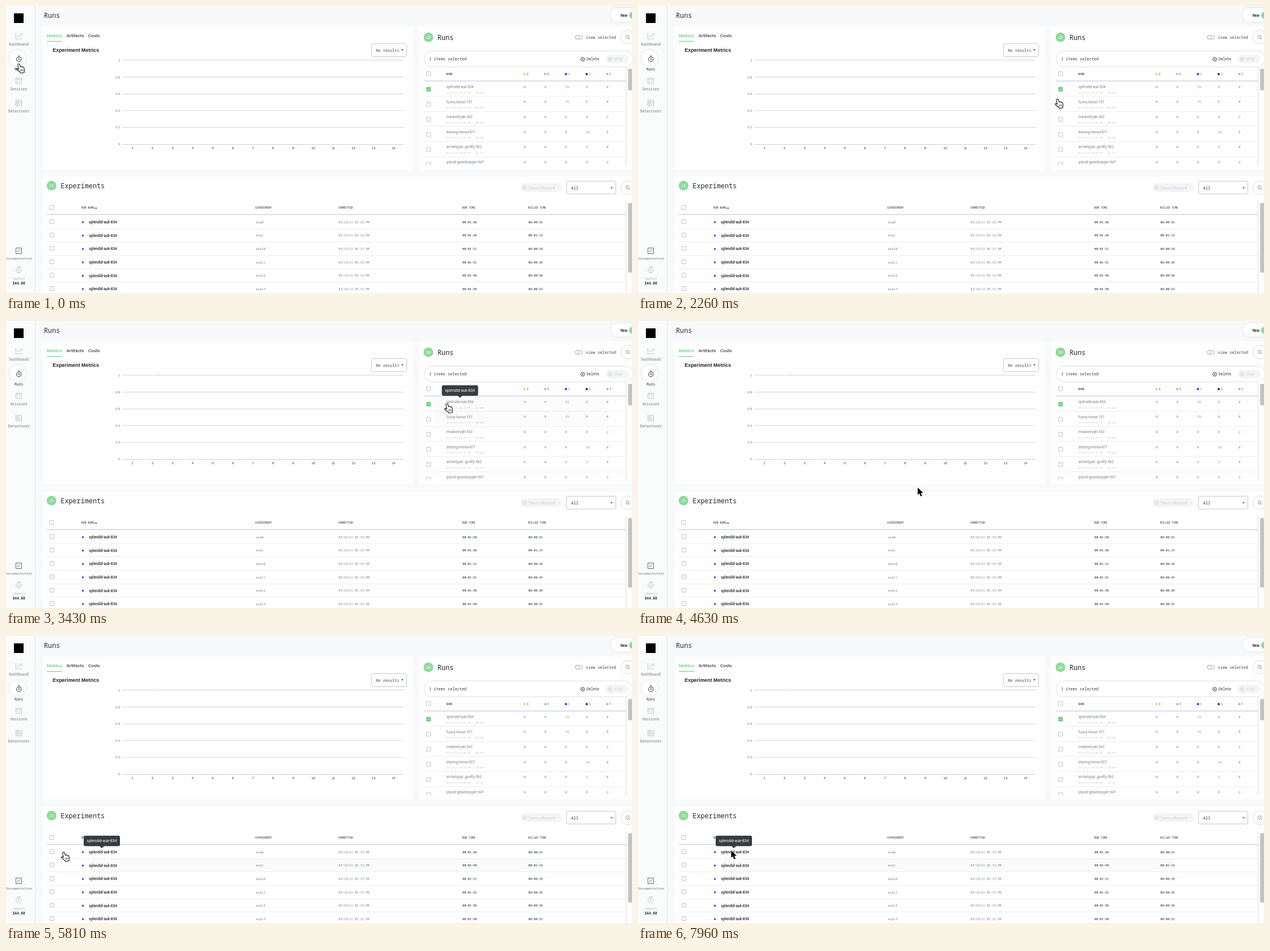
These frames come from a looping animation (1104x507 px, 8 s). An HTML page with a canvas:

```html
<!DOCTYPE html>
<html lang="en">
<head>
<meta charset="utf-8">
<title>Runs</title>
<style>
html, body { margin: 0; width: 100%; height: 100%; overflow: hidden; background: #f8f9fa; }
canvas { display: block; width: 1104px; height: 507px; }
</style>
</head>
<body>
<canvas id="stage"></canvas>
<script>
const W = 1104, H = 507, LOOP = 8000;
const MONO = '"Noto Sans Mono", "DejaVu Sans Mono", monospace';
const SANS = 'Roboto, "Open Sans", sans-serif';
const ARIAL = '"Liberation Sans", Arial, sans-serif';
const INK = '#24282b', GREEN = '#5fd07a', BADGE = '#8fd99c', RULE = '#b9c5dc', EDGE = '#eceef0';

const canvas = document.getElementById('stage');
const dpr = window.devicePixelRatio || 1;
canvas.width = W * dpr;
canvas.height = H * dpr;
const screenCtx = canvas.getContext('2d');
const page = document.createElement('canvas');
page.width = canvas.width;
page.height = canvas.height;
let g = page.getContext('2d');

// y is the middle of the capitals
function text(str, x, y, size, color = INK, font = MONO, weight = 400, align = 'left', gap = 0) {
  g.font = `${weight} ${size}px ${font}`;
  g.letterSpacing = gap + 'px';
  g.textAlign = align;
  g.fillStyle = color;
  g.fillText(str, x, y + size * 0.357);
}
function rect(x, y, w, h, color) {
  g.fillStyle = color;
  g.fillRect(x, y, w, h);
}
function round(x, y, w, h, r, fill, stroke, lw = 1) {
  g.beginPath();
  g.roundRect(x, y, w, h, r);
  paint(fill, stroke, lw);
}
function circle(x, y, r, fill, stroke, lw = 1) {
  g.beginPath();
  g.arc(x, y, r, 0, Math.PI * 2);
  paint(fill, stroke, lw);
}
function paint(fill, stroke, lw) {
  if (fill) { g.fillStyle = fill; g.fill(); }
  if (stroke) { g.strokeStyle = stroke; g.lineWidth = lw; g.stroke(); }
}
function svg(d, x, y, fill, stroke, lw = 0.8) {
  const p = new Path2D(d);
  g.save();
  g.translate(x, y);
  g.lineJoin = 'round';
  if (fill) { g.fillStyle = fill; g.fill(p); }
  if (stroke) { g.strokeStyle = stroke; g.lineWidth = lw; g.stroke(p); }
  g.restore();
}
function shadowed(draw) {
  g.save();
  g.shadowColor = 'rgba(0,0,0,.09)';
  g.shadowBlur = 6 * dpr;
  draw();
  g.restore();
}
function checkbox(x, y, on) {
  round(x - 3.5, y - 3.5, 7, 7, 0.8, on ? GREEN : '#fff', on ? GREEN : '#a9adb1', 0.8);
  if (on) svg('M-2 0L-.6 1.6 2.2-1.6', x, y, null, '#fff', 1);
}
const caret = (x, y) => svg('M-2.2-1.1H2.2L0 1.3Z', x, y, '#3a3f44');
function search(x, y) {
  circle(x, y, 12, '#fff', '#d5d8dc', 0.9);
  circle(x - 0.4, y - 0.6, 2.9, null, '#70757a', 0.8);
  svg('M1.7 1.5L4 3.9', x, y, null, '#70757a');
}
function badge(x, y, n) {
  circle(x, y, 8.5, BADGE);
  text(n, x, y, 6.6, '#fff', MONO, 400, 'center');
}

function sidebar() {
  rect(0, 0, 51, H, '#fafbfb');
  rect(51, 0, 1, H, '#e1e4e7');
  rect(14, 13, 17, 17, '#000');
  shadowed(() => circle(20.5, 92, 14, '#fff'));
  const pale = '#b4b8bc';
  svg('M0 0V10H11M2 7L4.5 4 6.5 6 10.5 1.5M8 1.5H10.5V4', 17.2, 48, null, pale);
  circle(22.7, 94.2, 4.2, null, INK, 1);
  svg('M-1.6-6H1.6M0-2.2V.4H1.8M3.3-4.3L4.3-3.3', 22.7, 94.2, null, INK, 1);
  svg('M0 0H10V9.5H0ZM0 2.4H10M3.8 4.4L2.4 5.8 3.8 7.2M6.2 4.4L7.6 5.8 6.2 7.2', 17.5, 127.5, null, pale);
  svg('M0 0H10V10H0ZM0 3.3H10M0 6.6H10M3.3 0V10', 17.5, 166.5, null, pale);
  svg('M0 0H10V10H0ZM2.3 7.7L7.7 2.3', 17.5, 427.5, null, '#555a5f', 0.9);
  svg('M-2.5-3.6L-1.6-6H1.6L2.5-3.6', 22.5, 466, null, pale);
  circle(22.5, 467, 4.6, null, pale, 0.9);
  text('$', 22.5, 467, 5.5, pale, MONO, 600, 'center');
  const label = (s, y, size, color, weight) => text(s, 22.6, y, size, color, MONO, weight, 'center');
  label('Dashboard', 68, 6.4, '#6b7075');
  label('Runs', 112, 6.4, '#33383c');
  label('Sessions', 146.5, 6.4, '#6b7075');
  label('Datastores', 185.5, 6.4, '#6b7075');
  label('Documentation', 446, 6.1, '#6b7075');
  label('CREDIT', 482, 5.9, '#b0b4b8');
  label('$44.88', 489.5, 6.1, INK, 600);
}

function metrics() {
  rect(64, 36, 653, 253, '#fefefe');
  text('Metrics', 72, 52.5, 7.9, GREEN, SANS, 500);
  text('Artifacts', 106.7, 52.5, 7.9, '#3c4146', SANS, 500);
  text('Costs', 145, 52.5, 7.9, '#3c4146', SANS, 500);
  rect(72, 62, 26.5, 1, GREEN);
  text('Experiment Metrics', 82.3, 78, 8.9, '#222', ARIAL, 700);
  round(644.5, 66.5, 62, 23, 3, '#fff', '#b9c0d0', 0.9);
  text('No results', 652.7, 78.5, 6.8, '#3c4146');
  caret(699, 77.5);
  for (let i = 0; i < 6; i++) {
    const y = 244 - i * 29.65;
    rect(205, Math.round(y - 0.5), 496, 1, i ? '#d6d6d6' : '#cfcfcf');
    text(String(i / 5), 201.3, y, 6, '#777', ARIAL, 400, 'right');
  }
  rect(257, 95, 2, 1, '#eee');
  for (let i = 0; i < 14; i++) {
    rect(205 + i * 35.43, 244, 0.7, 2, '#d0d0d0');
    text(String(i + 1), 223 + i * 35.43, 251, 6, '#333', ARIAL, 400, 'center');
  }
}

const RUNS = [
  ['splendid-auk-834', '05:33 PM - (00:00)', 'C', '15'],
  ['funny-horse-737', '05:24 PM - (00:00)', 'C', '15'],
  ['masked-yak-342', '05:00 PM - (00:00)', 'F', '2'],
  ['blazing-menul-871', '03:15 PM - (00:00)', 'S', '15'],
  ['archetypal..gonfly-562', '10:00 PM - (02:18)', 'S', '3'],
  ['placid-grasshopper-647', '10:00 PM - (00:00)', 'F', '2']
];
const STATES = [['Q', '#f0cc6c'], ['R', '#8bd998'], ['C', '#4a2df0'], ['S', '#33383c'], ['F', '#f29b9b']];

function runs() {
  rect(729, 36, 375, 253, '#fefefe');
  badge(745, 55.3, '26');
  text('Runs', 761, 55.5, 11.8);
  round(1003.8, 51.8, 13, 7, 3.5, '#f2f3f4', '#a5a9ad', 0.8);
  circle(1007.4, 55.3, 3, '#fff', '#a5a9ad', 0.7);
  text('view selected', 1022.8, 55.8, 6.8, '#3c4146');
  search(1096.5, 55);
  round(737.5, 79.5, 368, 28, 14, '#fff', '#d9dce0', 0.9);
  text('1 items selected', 746, 94, 6.9, '#33383c');
  circle(1017, 94, 3.4, null, INK, 0.9);
  svg('M-1.2-1.2L1.2 1.2M1.2-1.2L-1.2 1.2', 1017, 94, null, INK);
  text('Delete', 1024, 93.7, 6.2, INK, MONO, 500);
  round(1058, 86, 40, 15, 7.5, '#f3f4f6');
  circle(1065, 94, 3.2, null, '#c9ccd1', 0.9);
  rect(1064, 93, 2, 2, '#c9ccd1');
  text('Stop', 1072.5, 93.7, 6.2, '#c9ccd1');

  checkbox(745, 119.7);
  text('NAME', 776.5, 120.5, 4.3, '#55595e', MONO, 600, 'left', 0.2);
  STATES.forEach(([s, color], i) => {
    const x = 912.5 + i * 36.6;
    rect(x, 118.5, 3.6, 3.6, color);
    text(s, x + 6, 120.5, 4.6, '#55595e', MONO, 500);
  });
  rect(737, 132, 356, 1, RULE);
  g.save();
  g.beginPath();
  g.rect(737, 133, 356, 148.5);
  g.clip();
  RUNS.forEach(([name, when, state, count], i) => {
    const y = 142.8 + i * 26.6;
    checkbox(745.3, y + 4.2, i === 0);
    text(name, 776.8, y, 6.3, '#7f848a', SANS);
    text('03/19/21 ' + when, 776.8, y + 10.4, 4.15, '#c6c9cd');
    STATES.forEach(([s], k) => text(s === state ? count : '0', 913 + k * 36.5, y, 5.8, '#83888d'));
    rect(737, Math.round(y + 16.3), 356, 1, EDGE);
  });
  g.restore();
  rect(1093, 108, 1, 174, '#dddfe2');
  round(1097, 111, 8, 38, 3, '#c2c3c5');
}

const JOBS = [
  ['exp0', '01:50', '00:53'], ['exp1', '01:50', '01:14'], ['exp10', '01:11', '00:19'],
  ['exp11', '01:51', '00:45'], ['exp12', '01:50', '00:58'], ['exp13', '01:50', '00:53']
];
const HEADS = [['RUN NAME', 133], ['EXPERIMENT', 440], ['SUBMITTED', 586], ['RUN TIME', 804.5], ['BILLED TIME', 921]];

function experiments() {
  rect(64, 301, 1040, 206, '#fefefe');
  badge(80.3, 317.2, '15');
  text('Experiments', 96.3, 317.5, 11.8);
  round(908, 313.5, 72, 15, 7.5, '#f3f4f6');
  svg('M2.5-.3V2.5H-2.5V-2.5H0M-.5.6L2.6-2.5M1-2.7H2.7V-1', 914.3, 321, null, '#c3c7cc', 0.9);
  text('Tensorboard', 921.3, 321, 7.1, '#c9ccd1');
  round(988.5, 309.5, 87, 22.5, 3, '#fff', '#b9c0d0', 0.9);
  text('All', 996.8, 321.5, 6.9, '#33383c');
  caret(1068, 321.3);
  search(1096.5, 321);

  checkbox(80.3, 356);
  HEADS.forEach(([s, x]) => text(s, x, 356.8, 4.3, '#55595e', MONO, 600, 'left', 0.3));
  svg('M-2 1.2H2L0-1.4Z', 158.7, 356.8, '#33383c');
  rect(72, 368, 1021, 1, RULE);
  JOBS.forEach(([name, ran, billed], i) => {
    const y = 381.7 + i * 23.65;
    checkbox(80.8, y - 0.8);
    rect(134, y - 1.3, 3, 3, '#5b34f0');
    text('splendid-auk-834', 146.2, y, 6.35, '#202326', SANS, 500);
    text(name, 440.7, y, 5.6, '#7b8086');
    text('03/19/21 05:33 PM', 586.5, y, 5.32, '#7b8086');
    text('00:' + ran, 805, y, 5.25, '#5f6469', MONO, 600);
    text('00:' + billed, 921.3, y, 5.25, '#5f6469', MONO, 600);
    rect(72, Math.round(y + 11), 1021, 1, EDGE);
  });
  rect(1093, 345, 1, 162, '#dddfe2');
  round(1097, 348, 8, 123, 3, '#c2c3c5');
}

function drawPage() {
  g.setTransform(dpr, 0, 0, dpr, 0, 0);
  rect(0, 0, W, H, '#f8f9fa');
  sidebar();
  text('Runs', 67, 17, 11.8);
  shadowed(() => round(1067, 4, 60, 23, 11.5, '#fff'));
  text('New', 1084, 16.5, 6.4, INK, MONO, 600);
  circle(1105.5, 16.3, 6.5, BADGE);
  metrics();
  runs();
  experiments();
}

const HAND = 'M4 1.2C5 .7 5.8 1.2 6.2 2.2L7.6 6.5C8 5.7 9.2 5.6 9.6 6.6 10.1 6 11.3 6.1 11.6 7.1 12.2 6.6 13.3 6.9 13.6 7.9' +
  'L14.4 10.9C14.7 12.4 14.4 13.4 14 14.5L14.3 16.3 8.1 17.7 7.2 16.1C5.5 15 3.5 13.2 .9 11 .1 10 1 8.8 2.2 9.3' +
  'L4.3 10.4 2.9 3C2.7 2.2 3.2 1.5 4 1.2Z';
const ARROW = 'M.4.4V13.6L3.4 10.8 5.5 16 8 15 5.8 9.9H10Z';

function cursor(x, y, isHand) {
  if (isHand) {
    svg(HAND, x, y, '#fff', '#111', 1.1);
    svg('M7.4 11.5L8.2 14.5M9.4 11L10.2 14M11.4 10.5L12.1 13.4', x, y, null, '#111', 0.8);
  } else {
    svg(ARROW, x, y, '#000', '#fff', 1.2);
    svg(ARROW, x, y, '#000');
  }
}
function tooltip(x, y) {
  round(x - 32, y, 64, 18.5, 3, '#363c40');
  svg('M-4 0H4L0 4Z', x, y + 18.3, '#363c40');
  text('splendid-auk-834', x, y + 9, 6.95, '#fff', SANS, 400, 'center');
}

// Each move runs along a curve in held steps; the first `arrows` steps show the arrow
const TICK = 117;
const move = (at, steps, arrows, from, to = from, bend = from) => ({ at, steps, arrows, from, to, bend });
const MOVES = [
  move(0, 1, 0, [18, 101]),
  move(230, 1, 0, [18, 101.7]),
  move(1550, 3, 3, [197, 82], [638, 153], [462, 134]),
  move(2030, 7, 1, [692, 162], [761, 145], [840, 168]),
  move(2840, 1, 0, [755, 145]),
  move(3080, 4, 0, [757, 145], [773, 145], [766, 145]),
  move(4510, 5, 3, [690, 195], [195, 395], [247, 425]),
  move(5220, 7, 0, [182, 388], [86, 380], [116, 382]),
  move(6050, 4, 0, [82, 379], [75, 378], [76, 378]),
  move(6760, 7, 0, [80, 379], [159, 380], [150, 380]),
  move(7960, 1, 1, [164, 378.3])
];

function pointer(t) {
  const m = MOVES.findLast(m => m.at <= t);
  const step = Math.min(m.steps - 1, Math.floor((t - m.at) / TICK));
  const u = m.steps > 1 ? step / (m.steps - 1) : 0, v = 1 - u;
  const [x, y] = m.from.map((p, i) => v * v * p + 2 * u * v * m.bend[i] + u * u * m.to[i]);
  cursor(x, y, step >= m.arrows);
}

function frame(now) {
  const t = now % LOOP;
  const within = (a, b) => t >= a && t < b;
  g.setTransform(1, 0, 0, 1, 0, 0);
  g.drawImage(page, 0, 0);
  g.setTransform(dpr, 0, 0, dpr, 0, 0);
  if (within(2270, 4510)) rect(757, 134, 304, 50, 'rgba(110,130,150,.025)');
  if (t >= 4980) rect(146, 394, 801, 22, 'rgba(110,130,150,.035)');
  if (within(2500, 2840) || within(3200, 4510)) tooltip(800.6, 113.5);
  if (within(5460, 5930) || t >= 7120) tooltip(169, 352.7);
  pointer(t);
  requestAnimationFrame(() => frame(performance.now() - start));
}

drawPage();
g = screenCtx;
const start = performance.now();
frame(0);
</script>
</body>
</html>
```
